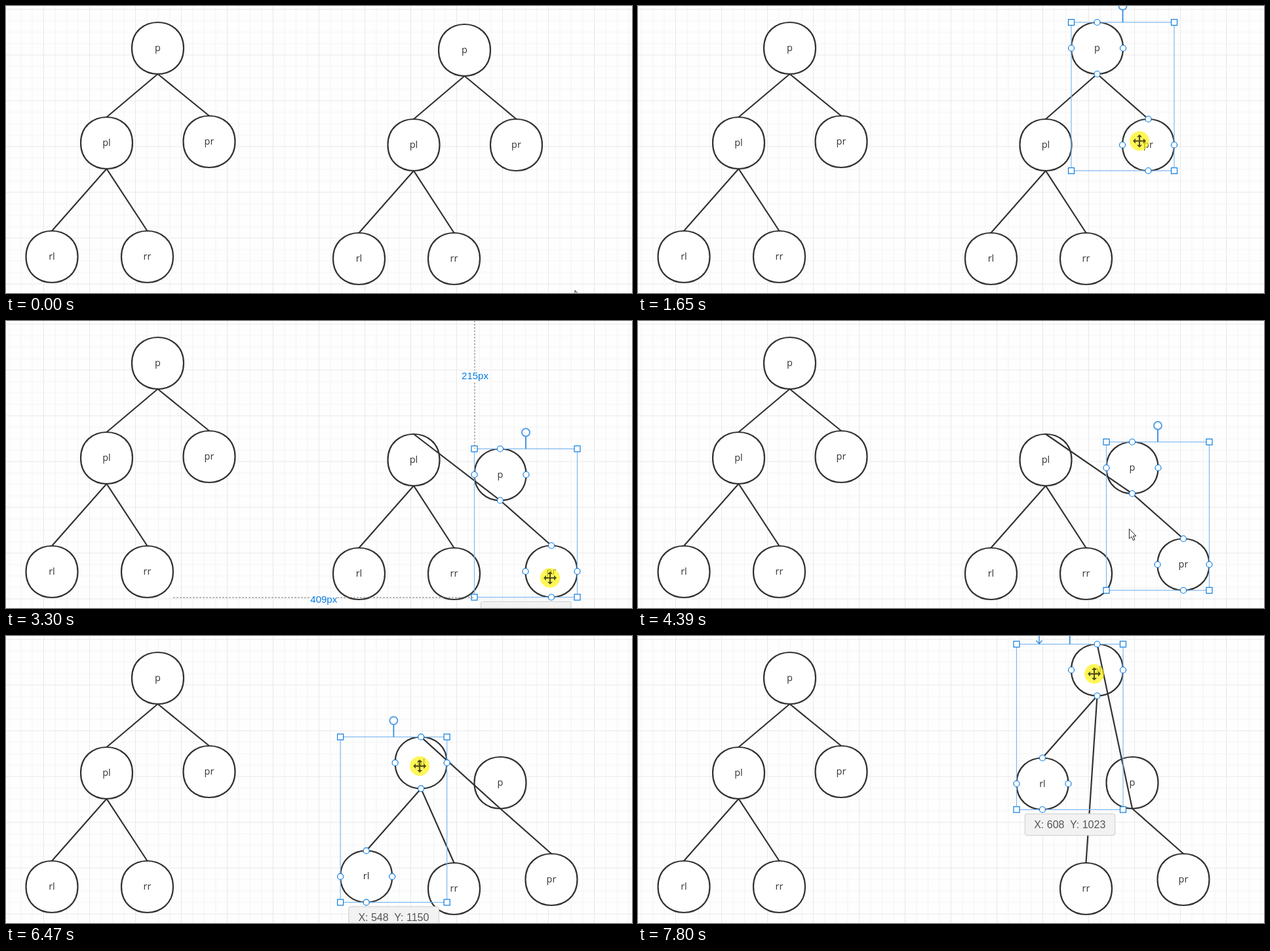
An HTML page for the animation above (8 s loop, 955x439 px).

```html
<!DOCTYPE html>
<html lang="en">
<head>
<meta charset="utf-8">
<title>Tree rotation</title>
<style>
html, body { margin: 0; width: 100%; height: 100%; overflow: hidden; background: #fefefe; }
svg { display: block; width: 955px; height: 439px; }
.node { fill: #fff; stroke: #323232; stroke-width: 2.2; }
.link { stroke: #323232; stroke-width: 2.2; stroke-linecap: round; }
.name { font: 14.5px "Open Sans", "Noto Sans", sans-serif; fill: #323232; text-anchor: middle; }
.frame { fill: none; stroke: #7fb8ef; stroke-width: 1.2; }
.grip { fill: #fff; stroke: #0b7ce0; stroke-width: 1.2; }
.turn { fill: #fff; stroke: #559fe6; stroke-width: 2; }
.stem { stroke: #2f8be2; stroke-width: 1.8; fill: none; }
.guide { stroke: #777; stroke-width: 1; stroke-dasharray: 3 2; }
.dist { font: 15px "Liberation Sans", Arial, sans-serif; fill: #067be0; text-anchor: middle; }
.tip { fill: #f2f2f2; stroke: #cbcbcb; }
.pos { font: 16px "Liberation Sans", Arial, sans-serif; fill: #555; text-anchor: middle; }
</style>
</head>
<body>
<svg viewBox="0 0 955 439">
  <defs>
    <pattern id="grid" x="57" y="4.5" width="70" height="70" patternUnits="userSpaceOnUse">
      <path d="M18 0V70M35.5 0V70M53 0V70M0 18H70M0 35.5H70M0 53H70" stroke="#f3f3f3"/>
      <path d="M.5 0V70M0 .5H70" stroke="#e8e8e8"/>
    </pattern>
  </defs>
  <rect width="955" height="439" fill="#fefefe"/>
  <rect width="955" height="439" fill="url(#grid)"/>
  <g id="fixed"></g>
  <g id="live"></g>
</svg>
<script>
const LOOP = 8000, R = 39.5, UNIT = 0.89;
const LINKS = [['p', 'pl'], ['p', 'pr'], ['pl', 'rl'], ['pl', 'rr']];
const LEFT = { p: [231.5, 64.5], pl: [153.5, 209.5], pr: [310, 207.5], rl: [70, 383.5], rr: [215.5, 383.5] };
const RIGHT = { p: [700.5, 64.5], pl: [622, 212.5], pr: [778.5, 212.5], rl: [538.5, 386.5], rr: [683.5, 386.5] };

// Keys are [time, x, y]
const POINTER = [
  [100, 868, 435], [600, 699, 66], [720, 699, 66], [880, 700, 62], [940, 700, 62],
  [1500, 765, 206.5], [1750, 765, 206.5], [1980, 775.5, 236.5], [2170, 775.5, 236.5],
  [2310, 777, 225], [2450, 777, 225], [2730, 805, 300], [3220, 830, 393], [3590, 830, 393],
  [3690, 830, 383], [4200, 830, 383], [4650, 622, 215], [5050, 622, 215], [5430, 557, 354],
  [5600, 552, 362], [5890, 552, 362], [6200, 620, 218], [6260, 620, 218], [6660, 650, 166],
  [6890, 682, 107.5], [7200, 693, 72], [7480, 697, 63], [7540, 697, 63], [7800, 696, 58]
];
const NUDGE = [[720, -1, 3], [880, 0, 0]];
const DRAG_P = [[2450, 0, 0], [2730, 23.2, 74.2], [3200, 53, 169], [3270, 53.5, 170.5],
  [3590, 53.5, 170.5], [3690, 53.5, 160]];
const DRAG_PL = [[6260, 0, 0], [6660, 30, -51], [6890, 61.5, -111], [7200, 74, -147], [7480, 78.5, -160.5]];

const PRESSES = [[720, 900], [1580, 1710], [2440, 4200], [4690, 4800], [5690, 5800], [6250, LOOP]];
const DRAGS = [[740, 900], [2460, 4200], [6270, LOOP]];
const PICKS = [[0, []], [720, ['p']], [1580, ['p', 'pr']], [4700, ['pl']], [5700, ['pl', 'rl']]];

const within = (t, [a, b]) => t >= a && t < b;
const anyOf = (t, spans) => spans.some(s => within(t, s));

// Monotone cubic through the keys, at rest on plateaus
function track(keys, t) {
  const last = keys.length - 1;
  if (t <= keys[0][0]) return keys[0].slice(1);
  if (t >= keys[last][0]) return keys[last].slice(1);
  const i = keys.findIndex(k => k[0] > t) - 1;
  const h = keys[i + 1][0] - keys[i][0], u = (t - keys[i][0]) / h;
  return [1, 2].map(c => {
    const slope = j => j < 0 || j >= last ? 0 : (keys[j + 1][c] - keys[j][c]) / (keys[j + 1][0] - keys[j][0]);
    const tangent = j => {
      const a = slope(j - 1), b = slope(j);
      return a * b > 0 ? 2 * a * b / (a + b) : 0;
    };
    const a = keys[i][c], b = keys[i + 1][c], v = 1 - u;
    return a * (1 + 2 * u) * v * v + b * u * u * (3 - 2 * u)
      + h * (tangent(i) * u * v * v - tangent(i + 1) * u * u * v);
  });
}

const add = (a, b) => [a[0] + b[0], a[1] + b[1]];
const line = (x1, y1, x2, y2, cls) => `<line class="${cls}" x1="${x1}" y1="${y1}" x2="${x2}" y2="${y2}"/>`;
const dot = (x, y, r, attrs) => `<circle cx="${x}" cy="${y}" r="${r}" ${attrs}/>`;
const box = (x, y, w, h, attrs) => `<rect x="${x}" y="${y}" width="${w}" height="${h}" ${attrs}/>`;
const text = (x, y, s, cls) => `<text class="${cls}" x="${x}" y="${y}">${s}</text>`;

function node(name, [x, y]) {
  const d = 2 * R, k = d * 2 / 3;
  return `<path class="node" d="M${x - R} ${y}C${x - R} ${y - k} ${x + R} ${y - k} ${x + R} ${y}`
    + `C${x + R} ${y + k} ${x - R} ${y + k} ${x - R} ${y}Z"/>` + text(x, y + 4.5, name, 'name');
}

function tree(at) {
  return Object.keys(at).map(n => node(n, at[n])).join('')
    + LINKS.map(([a, b]) => line(at[a][0], at[a][1] + R, at[b][0], at[b][1] - R, 'link')).join('');
}

function ports([x, y]) {
  return [[0, -R], [R, 0], [0, R], [-R, 0]].map(([a, b]) => dot(x + a, y + b, 4.5, 'class="grip"')).join('');
}

function bounds(points) {
  const xs = points.map(p => p[0]), ys = points.map(p => p[1]);
  return { l: Math.min(...xs) - R, r: Math.max(...xs) + R, t: Math.min(...ys) - R, b: Math.max(...ys) + R };
}

function selection({ l, r, t, b }) {
  const mid = (l + r) / 2;
  const corners = [[l, t], [r, t], [l, b], [r, b]];
  return box(l, t, r - l, b - t, 'class="frame"')
    + line(mid, t, mid, t - 19, 'stem') + dot(mid, t - 25, 6, 'class="turn"')
    + corners.map(([x, y]) => box(x - 4.5, y - 4.5, 9, 9, 'class="grip"')).join('');
}

function distance(x, y, len) {
  const s = Math.round(len * UNIT) + 'px', w = s.length * 8.2;
  return box(x - w / 2, y - 8, w, 17, 'fill="#fefefe"') + text(x, y + 5, s, 'dist');
}
const across = (x1, x2, y) => line(x1, y, x2, y, 'guide') + distance((x1 + x2) / 2, y + 3, x2 - x1);
const down = (x, y1, y2) => line(x, y1, x, y2, 'guide') + distance(x + 0.5, (y1 + y2) / 2 + 9, y2 - y1);

function guides(t, { l, r, t: top, b }) {
  if (within(t, [830, 940])) return across(271, l, 25);
  if (within(t, [2700, 2770])) return down(r, -400, top) + across(661.5, l, 213);
  if (within(t, [3265, 3600])) return down(l + 0.5, -46, top) + across(255, l, 423);
  if (within(t, [6310, 6380])) return across(349.5, l, 168);
  if (within(t, [6850, 6940])) return down(r, b, 347);
  if (within(t, [7180, 7260])) return across(271, l, 25);
  if (t >= 7480) return '<path class="stem" style="stroke-width:1.4" d="M612 0V12M607.5 7L612 12L616.5 7"/>';
  return '';
}

function tooltip({ l, r, t, b }) {
  const mid = (l + r) / 2;
  const x = Math.round(593.4 + (l - 561) * 0.89), y = Math.round(1100 + (t - 99) * 0.895);
  return box(mid - 68.5, b + 6.5, 137.5, 33, 'rx="3" class="tip"')
    + text(mid, b + 28.5, `X: ${x}\u00a0 Y: ${y}`, 'pos');
}

function flow(at, name, age) {
  return LINKS.filter(k => k[0] === name).map(([a, b]) => {
    const [x, y] = at[a], dx = at[b][0] - x, dy = at[b][1] - y - 2 * R;
    const u = age * 0.0715 / Math.hypot(dx, dy);
    return u < 1 ? dot(x + dx * u, y + R + dy * u, 3.5, 'fill="#d9504d"') : '';
  }).join('');
}

function pointer([x, y], moving, pressed) {
  if (!moving) {
    return `<path transform="translate(${x} ${y})" d="M0 0V15L3.5 12L6 17.5L8.5 16.5L6 11H10.5Z" fill="#fff" stroke="#222"/>`;
  }
  const halo = pressed ? dot(x, y, 15, 'fill="#fff200" opacity=".66"') : '';
  const look = pressed ? 'fill="#504d1c"' : 'fill="#000" stroke="#fff" stroke-width="1.6" paint-order="stroke"';
  return halo + `<path transform="translate(${x} ${y})" ${look} d="M0-10l4 4h-3v5h5v-3l4 4-4 4v-3h-5v5h3l-4 4-4-4h3v-5h-5v3l-4-4 4-4v3h5v-5h-3z"/>`;
}

function render(t) {
  const a = track(DRAG_P, t), b = track(DRAG_PL, t), hand = track(POINTER, t);
  const at = {
    p: add(add(RIGHT.p, track(NUDGE, t)), a), pl: add(RIGHT.pl, b),
    pr: add(RIGHT.pr, a), rl: add(RIGHT.rl, b), rr: RIGHT.rr
  };
  const [since, picked] = PICKS.filter(k => k[0] <= t).pop();
  const dragging = anyOf(t, DRAGS);
  const over = Object.keys(at).find(n => Math.hypot(hand[0] - at[n][0], hand[1] - at[n][1]) < R);
  const marked = new Set(picked);
  if (over && !dragging) marked.add(over);

  let out = tree(at);
  if (picked.length === 1) out += flow(at, picked[0], t - since);
  const area = picked.length ? bounds(picked.map(n => at[n])) : null;
  if (area) out += selection(area);
  marked.forEach(n => out += ports(at[n]));
  if (area) {
    out += guides(t, area);
    if (dragging) out += tooltip(area);
  }
  out += pointer(hand, dragging || over, anyOf(t, PRESSES));
  document.getElementById('live').innerHTML = out;
}

document.getElementById('fixed').innerHTML = tree(LEFT);
const start = performance.now();
function tick() {
  render((performance.now() - start) % LOOP);
  requestAnimationFrame(tick);
}
tick();
</script>
</body>
</html>
```
